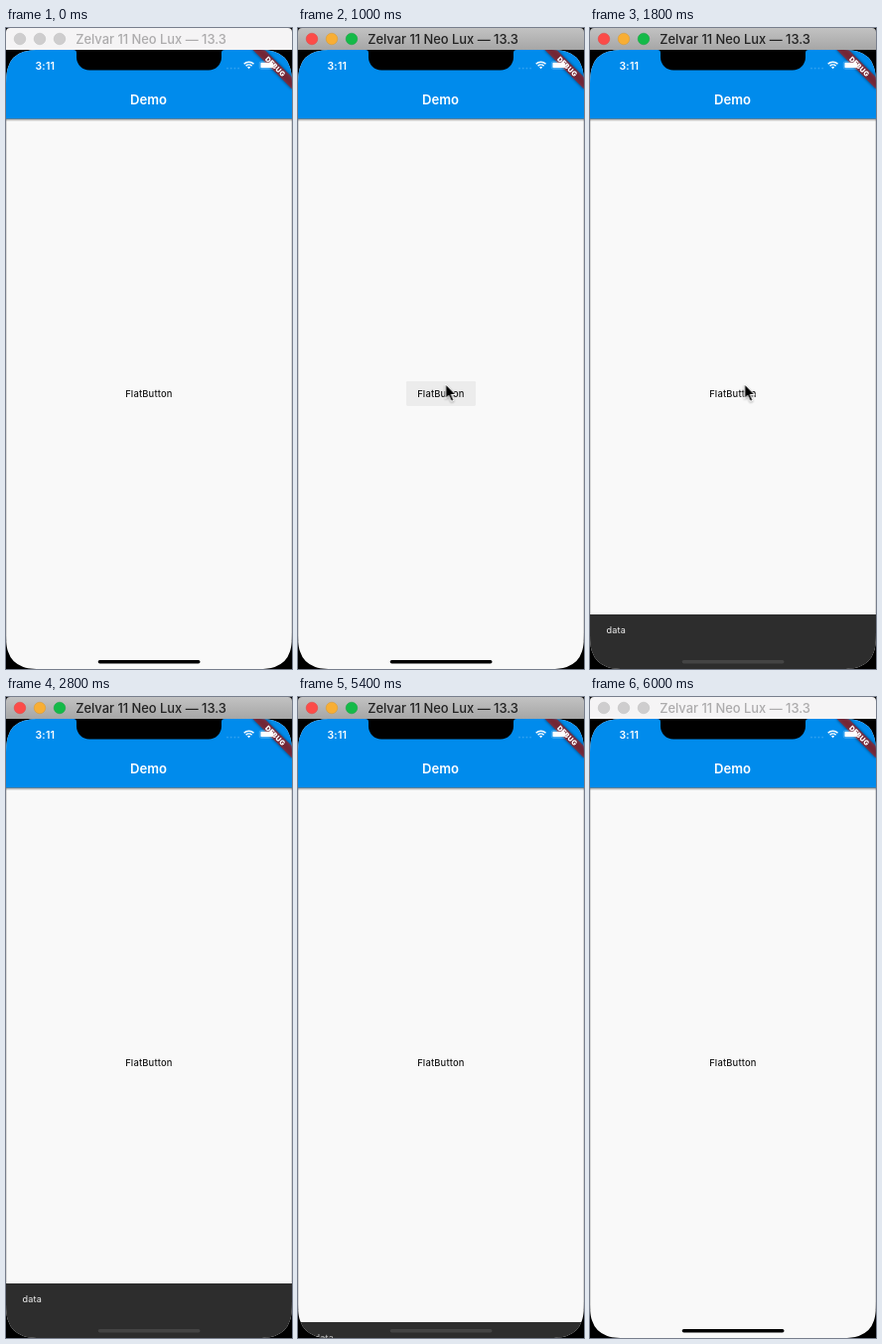
An HTML page for the animation above (6.2 s loop, 288 by 646 pixels).

```html
<!DOCTYPE html>
<html lang="en">
<head>
<meta charset="utf-8">
<title>Snackbar demo</title>
<style>
  html, body { margin: 0; width: 100%; height: 100%; overflow: hidden; background: #000; }
  svg { display: block; width: 288px; height: 646px; font-family: Inter, Roboto, sans-serif; }
  .mid { text-anchor: middle; }

  /* every state changes abruptly on a 200 ms grid */
  .step { animation: 6200ms step-end infinite; }
  .focus { animation-name: focus; }
  .blur { animation-name: blur; }
  .press { animation-name: press; }
  .cursor { animation-name: cursor; }
  .snack { animation-name: snack; }
  .label { animation-name: label; }
  .home { animation-name: home; }

  @keyframes focus {
    0%, 93.54% { visibility: hidden; }
    12.9% { visibility: visible; }
  }
  @keyframes blur {
    0%, 93.54% { visibility: visible; }
    12.9% { visibility: hidden; }
  }
  @keyframes press {
    0%, 19.35% { visibility: hidden; }
    16.12% { visibility: visible; }
  }
  @keyframes cursor {
    0% { visibility: hidden; transform: translate(148.6px, 359px); }
    9.67% { visibility: visible; transform: translate(148.6px, 359px); }
    25.8% { visibility: visible; transform: translate(155.6px, 359px); }
    35.48%, 100% { visibility: hidden; transform: translate(155.6px, 359px); }
  }
  @keyframes snack {
    0%, 90.32%, 100% { visibility: hidden; transform: translateY(55px); }
    19.35% { visibility: visible; transform: none; }
    87.09% { visibility: visible; transform: translateY(39px); }
  }
  @keyframes label {
    0% { opacity: 1; }
    87.09%, 100% { opacity: .75; }
  }
  @keyframes home {
    0%, 90.32%, 100% { fill: #000; }
    19.35% { fill: #444; }
  }
</style>
</head>
<body>
<svg viewBox="0 0 288 646">
  <defs>
    <!-- a quarter of the display with a continuous corner, mirrored four ways -->
    <path id="quarter" d="M144 312V0H42C29.9 0 23.9 0 17.4 2.1A23.5 23.5 0 0 0 2.1 17.4C0 23.9 0 29.9 0 42V312z"/>
    <clipPath id="screen">
      <use href="#quarter" transform="translate(0 22)"/>
      <use href="#quarter" transform="translate(288 22) scale(-1 1)"/>
      <use href="#quarter" transform="translate(0 646) scale(1 -1)"/>
      <use href="#quarter" transform="translate(288 646) scale(-1 -1)"/>
    </clipPath>
    <linearGradient id="chrome" x2="0" y2="1">
      <stop stop-color="#c2c2c2"/><stop offset="1" stop-color="#a6a6a6"/>
    </linearGradient>
    <linearGradient id="shade" x2="0" y2="1">
      <stop stop-opacity=".4"/><stop offset="1" stop-opacity="0"/>
    </linearGradient>
    <filter id="soft" x="-20%" y="-60%" width="140%" height="220%"><feGaussianBlur stdDeviation="1.8"/></filter>
    <filter id="drop" x="-40%" y="-30%" width="180%" height="170%">
      <feDropShadow dx="0" dy="1" stdDeviation=".8" flood-opacity=".35"/>
    </filter>
    <path id="bar" d="M0 22V4a4 4 0 0 1 4-4H284a4 4 0 0 1 4 4V22z"/>
    <circle id="dot" cy="11" r="5.8" stroke-width=".5"/>
    <text id="name" class="mid" x="146" y="16" font-size="12.9" font-weight="500">Zelvar 11 Neo Lux — 13.3</text>
  </defs>

  <!-- window bar -->
  <g class="step blur">
    <use href="#bar" fill="#f5f4f5"/>
    <g fill="#cecdce" stroke="#bdbcbd">
      <use href="#dot" x="14"/><use href="#dot" x="34"/><use href="#dot" x="54"/>
    </g>
    <use href="#name" fill="#acabac"/>
  </g>
  <g class="step focus">
    <use href="#bar" fill="url(#chrome)"/>
    <use href="#dot" x="14" fill="#fc4b48" stroke="#e0413d"/>
    <use href="#dot" x="34" fill="#f8ae34" stroke="#d9982c"/>
    <use href="#dot" x="54" fill="#14ba48" stroke="#10a23d"/>
    <use href="#name" fill="#222"/>
  </g>

  <g clip-path="url(#screen)">
    <rect y="22" width="288" height="624" fill="#f9f9f9"/>
    <path d="M.5 92V618M287.5 92V618" stroke="#000" stroke-opacity=".13"/>

    <!-- app bar -->
    <rect y="22" width="288" height="69.5" fill="#008bec"/>
    <rect y="91" width="288" height="3.5" fill="url(#shade)"/>
    <text class="mid" x="143.5" y="77" font-size="13.1" font-weight="600" fill="#fff">Demo</text>

    <!-- corner ribbon -->
    <g transform="translate(288 22) rotate(45)">
      <rect x="-28" y="19.5" width="56" height="8.4" fill-opacity=".6" filter="url(#soft)"/>
      <rect x="-28" y="19.5" width="56" height="8.4" fill="#b71c1c" fill-opacity=".63"/>
      <text class="mid" y="26.3" font-size="7" font-weight="900" letter-spacing=".2" fill="#fff">DEBUG</text>
    </g>

    <!-- status bar -->
    <path d="M68 22q3 0 3 3v4.5a13 13 0 0 0 13 13H204a13 13 0 0 0 13-13v-4.5q0-3 3-3z"/>
    <g fill="#fff">
      <text x="29.4" y="41.7" font-size="10.5" font-weight="600" letter-spacing=".25">3:11</text>
      <g fill-opacity=".2">
        <circle cx="223" cy="40.6" r=".9"/><circle cx="226.7" cy="40.6" r=".9"/>
        <circle cx="230.4" cy="40.6" r=".9"/><circle cx="234.1" cy="40.6" r=".9"/>
      </g>
      <g transform="translate(244.6 41.2)">
        <path d="M-4.9-4.9A6.9 6.9 0 0 1 4.9-4.9M-3-3A4.3 4.3 0 0 1 3-3" fill="none" stroke="#fff" stroke-width="1.6"/>
        <path d="M0 0L-1.6-1.6A2.3 2.3 0 0 1 1.6-1.6z"/>
      </g>
      <rect x="255.3" y="33.7" width="15" height="7.6" rx="2" fill="none" stroke="#fff" stroke-opacity=".35" stroke-width=".7"/>
      <rect x="256.4" y="34.8" width="12.8" height="5.4" rx="1"/>
      <rect x="271.2" y="36.2" width="1" height="2.6" rx=".5" fill-opacity=".4"/>
    </g>

    <!-- button -->
    <rect class="step press" x="109" y="356" width="70" height="25" rx="1.4" fill="#ececec"/>
    <text class="mid" x="143.9" y="372.3" font-size="9.35" font-weight="500" letter-spacing=".18" fill="#161616">FlatButton</text>

    <!-- snackbar -->
    <g class="step snack">
      <rect y="591" width="288" height="56" fill="#2d2d2d"/>
      <text class="step label" x="16.5" y="610" font-size="9.1" letter-spacing=".15" fill="#f4f4f4">data</text>
    </g>
    <rect class="step home" x="92.7" y="637" width="102.8" height="3.5" rx="1.75"/>
  </g>

  <g class="step cursor">
    <path d="M0 0V14.3L3.2 11.4 5.8 17.3 8.2 16.2 5.7 10.5H10.1z" stroke="#fff" stroke-width="1" filter="url(#drop)"/>
  </g>
</svg>
</body>
</html>
```
